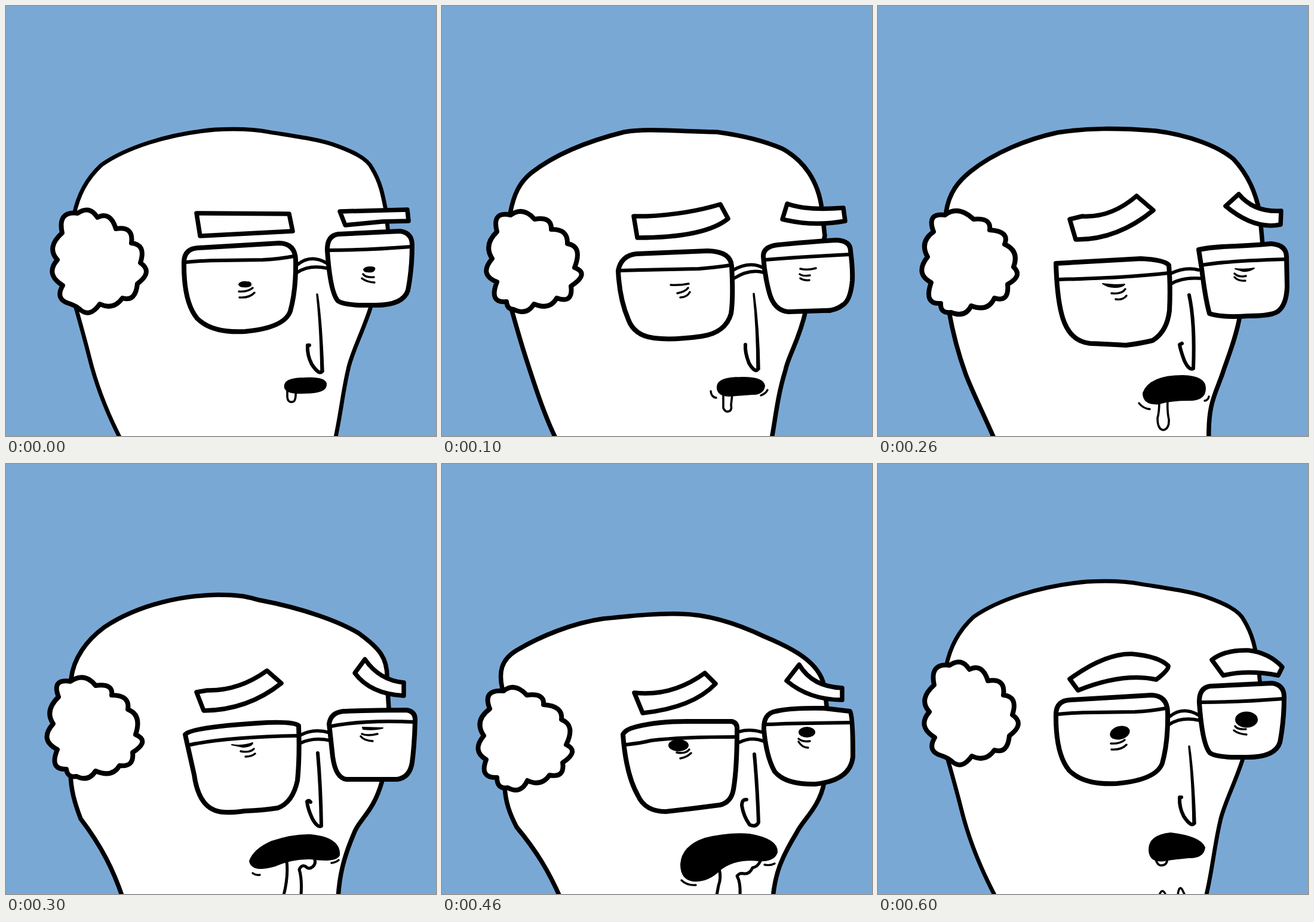
Recreate the animation shown at these times as an HTML page without scripts. Size 720x720 px, loop 700 ms.

```html
<!DOCTYPE html>
<html lang="en">
<head>
<meta charset="utf-8">
<title>Yawn</title>
<style>
html, body { margin: 0; width: 100%; height: 100%; overflow: hidden; background: #7aa8d4; }
svg { display: block; width: 100vw; height: 100vh; }
/* poses sit side by side; the strip jumps one stage width at a time */
.strip { animation: roll .7s steps(7) infinite; }
@keyframes roll { to { transform: translateX(-5040px); } }
path { fill: #fff; stroke: #000; stroke-width: 7.5; stroke-linecap: round; stroke-linejoin: round; }
.slim { stroke-width: 6.8; }
.hair { stroke-width: 8; }
.lens { stroke-width: 8; }
.lid, .nose { fill: none; stroke-width: 6; }
.bridge { fill: none; stroke-width: 5.5; }
.thin { fill: none; stroke-width: 3.4; }
.drool { stroke-width: 3.6; }
.drip { fill: none; stroke-width: 5; }
.ink { fill: #000; stroke-width: 2; }
.ridge { fill: #000; stroke-width: 3.5; }
</style>
</head>
<body>
<svg viewBox="0 0 720 720">
<defs>
  <g id="calm">
    <path class="slim" d="M198 737C165 675 150 630 140 590C132 558 124 530 117 505L114 350C120 318 134 290 160 266C200 238 270 214 350 207C390 205 420 207 440 211C490 219 520 223 545 231C580 243 605 255 613 272C627 295 631 316 636 342L640 380L612 500C600 540 578 582 573 608C563 650 560 690 549 735Z"/>
    <path class="hair" d="M120 347Q140 333 153 354Q175 343 184 373Q214 368 210 397Q235 399 225 430Q247 445 220 465Q217 496 195 489Q180 510 157 499Q141 522 125 509Q117 502 108 499Q81 492 95 468Q65 449 86 425Q67 404 94 380Q86 343 120 347Z"/>
    <path class="lens" d="M298 428Q299 406 322 405L458 397Q484 398 485 425Q486 475 476 511Q466 539 400 545Q345 548 320 523Q297 495 298 428Z"/>
    <path class="lens" d="M538 410Q537 385 556 382L660 377Q680 380 680 400Q680 440 673 476Q665 502 615 501Q568 502 556 494Q543 480 538 410Z"/>
    <path class="lid" d="M301 429Q330 426 360 426L430 425Q455 424 482 419M540 409Q600 409 679 403"/>
    <path class="bridge" d="M488 433Q510 415 536 430M488 446Q508 433 537 439"/>
    <path class="thin" d="M390 478Q405 479 413 472M391 488Q408 489 416 480M598 449Q602 455 616 454M596 456Q603 462 617 463"/>
    <path class="ridge" d="M521 483Q528 530 531 612L528 612Q527 540 521 483Z"/>
    <path class="nose" d="M529 612Q524 618 512 600Q504 585 505 568l3 0"/>
  </g>
  <g id="tense">
    <path d="M196 728C180 680 160 640 125 594C114 565 109 545 108 520L109 360C113 325 135 295 165 273C225 233 300 220 355 219C395 219 405 223 425 228C500 242 560 265 590 283C625 308 640 325 638 362L641 410L630 530C615 585 590 595 582 620C565 660 558 690 556 728Z"/>
    <path class="hair" d="M108 364Q132 348 150 371Q180 367 177 387Q208 387 204 411Q228 420 217 453Q242 464 212 483Q215 508 190 505Q178 526 150 514Q138 533 118 523Q103 526 101 511Q72 512 86 478Q55 462 79 435Q64 413 88 390Q76 359 108 364Z"/>
    <path d="M319 382L337 379Q390 380 437 346L461 367Q405 412 331 413Z"/>
    <path d="M584 350L601 327Q625 362 666 366L666 388Q610 385 584 350Z"/>
  </g>
</defs>
<g class="strip">

<g>
  <use href="#calm"/>
  <path d="M319 347L474 348L480 377L325 385Z"/>
  <path d="M559 344L672 341L674 360L630 361L568 367Z"/>
  <path class="ink" d="M390 466Q393 461 403 462Q411 462 410 467Q408 471 397 470Q391 470 390 466ZM599 441Q602 437 610 437Q619 437 617 441Q616 446 606 445Q599 445 599 441Z"/>
  <path class="drool" d="M471 644V655Q472 664 479 663Q486 663 485 645"/>
  <path class="ink" d="M467 634Q470 623 500 623Q533 621 536 632Q538 648 500 648Q463 650 467 634Z"/>
</g>

<g transform="translate(720)">
  <path d="M196 735C172 690 152 625 140 588C131 560 124 535 117 510L114 348C120 315 130 295 150 279C190 248 245 226 305 211C345 204 390 210 460 211C505 217 540 226 570 239C605 258 630 292 636 340L641 385L609 510C598 560 580 585 575 610C561 655 558 695 551 730Z"/>
  <path class="hair" d="M115 350Q136 335 155 357Q184 352 183 374Q211 373 210 398Q236 402 222 438Q248 448 216 469Q220 499 192 489Q181 510 154 499Q142 519 120 508Q109 508 108 495Q78 498 92 462Q61 450 84 423Q69 400 92 378Q83 343 115 350Z"/>
  <path class="lens" d="M295 443Q300 418 325 415L445 410Q483 411 485 435Q488 490 484 515Q475 547 435 553Q385 560 355 556Q322 552 312 525Q297 490 295 443Z"/>
  <path class="lens" d="M538 420Q537 403 562 400Q600 396 660 392Q684 393 684 410Q688 440 687 460Q684 492 672 500Q658 511 640 510L580 512Q556 510 548 480Q540 450 538 420Z"/>
  <path class="lid" d="M296 443L430 440Q465 437 482 434M541 425Q600 420 683 416"/>
  <path class="bridge" d="M488 442Q515 427 537 438M489 456Q515 440 538 446"/>
  <path class="thin" d="M383 467Q398 468 413 465M394 481Q408 478 412 472M399 488Q410 488 415 479M600 440Q612 443 626 439M599 449Q604 453 616 451M600 456Q606 460 615 459"/>
  <path class="ridge" d="M522 482Q530 540 531 608L528 608Q528 540 522 482Z"/>
  <path class="nose" d="M529 608Q524 615 514 598Q507 580 508 567"/>
  <path d="M321 352L342 352Q410 349 466 332L479 356Q440 388 327 388Z"/>
  <path d="M578 331Q610 343 672 338L675 360Q620 370 570 357Z"/>
  <path class="drool" d="M471 650V673Q474 680 479 679Q486 678 484 668L486 650"/>
  <path class="ink" d="M461 637Q462 622 500 622Q538 621 540 636Q538 650 520 650L480 653Q460 652 461 637Z"/>
  <path class="thin" d="M450 645Q451 655 459 656M534 652Q542 649 545 643"/>
</g>

<g transform="translate(1440)">
  <path d="M197 730C180 690 155 640 146 614C132 575 124 540 119 512L114 345C119 312 135 293 155 277C195 245 250 223 300 212C350 204 400 204 465 209C520 216 570 235 595 256C620 283 632 312 639 345L644 400L606 518C600 555 585 590 577 615C565 650 552 665 554 730Z"/>
  <path class="hair" d="M112 350Q134 333 160 357Q190 354 187 375Q221 377 212 399Q237 410 227 437Q243 452 217 466Q220 497 195 489Q184 513 156 502Q146 523 122 513Q104 515 105 498Q76 500 89 463Q61 448 83 420Q69 395 93 378Q81 346 112 350Z"/>
  <path class="lens" d="M298 431L440 423Q480 425 487 434Q490 470 488 510Q484 545 460 560Q440 565 415 568Q380 566 355 565Q325 562 312 530Q300 500 298 431Z"/>
  <path class="lens" d="M537 408Q560 403 600 402Q640 400 658 398Q684 400 684 420L685 470Q684 500 670 511Q660 519 620 519Q575 522 555 515Q548 490 542 440Z"/>
  <path class="lid" d="M301 458Q420 455 487 447M542 434Q580 427 683 424"/>
  <path class="bridge" d="M490 448Q515 436 537 442M491 465Q510 454 539 456"/>
  <path class="ink" d="M376 465Q400 468 413 466Q410 471 396 471Q385 471 376 465ZM598 440Q615 442 630 439Q622 445 611 444Z"/>
  <path class="thin" d="M391 481Q408 483 414 474M398 491Q410 493 416 485M597 448Q604 455 616 452M597 454Q603 461 615 460"/>
  <path class="nose" d="M521 484Q531 530 528 607Q521 611 513 594Q506 575 505 567l4-2"/>
  <path d="M321 357L342 352Q390 355 433 318L461 342Q400 392 331 391Z"/>
  <path d="M582 335L604 315Q630 346 675 343L674 366Q630 375 582 335Z"/>
  <path class="drool" d="M471 660Q471 680 468 690Q468 709 478 710Q488 708 487 692Q484 680 485 658"/>
  <path class="ink" d="M444 648Q455 619 510 619Q548 620 548 640Q548 661 520 660Q490 660 470 666Q444 668 444 648Z"/>
  <path class="thin" d="M437 665Q444 674 455 675M547 661Q553 660 554 654"/>
</g>

<g transform="translate(2160)">
  <use href="#tense"/>
  <path class="lens" d="M300 453Q310 441 420 434Q480 430 490 438Q492 490 488 530Q480 567 455 576Q430 580 400 581Q365 586 350 580Q322 570 315 520Z"/>
  <path class="lens" d="M541 435Q544 416 565 414Q620 412 670 412Q686 414 685 430Q684 470 680 500Q676 525 655 528L570 528Q552 526 547 490Z"/>
  <path class="lid" d="M309 470Q370 457 489 455M545 439Q600 428 684 432"/>
  <path class="bridge" d="M493 454Q515 442 542 450M494 467Q515 457 543 463"/>
  <path class="ink" d="M378 470Q395 473 413 467Q412 473 397 474ZM597 441L631 442Q618 446 598 444Z"/>
  <path class="thin" d="M393 481Q408 484 415 477M401 490Q411 490 417 485M596 452Q605 456 622 452M594 456Q599 463 614 464"/>
  <path class="nose" d="M522 484Q527 540 528 606Q522 610 513 594Q505 577 504 565q3-3 6 1"/>
  <path class="drip" d="M470 665Q473 690 465 722M516 660Q520 668 514 674Q507 680 502 674Q495 670 491 679Q496 695 494 722"/>
  <path class="ink" d="M408 665Q415 645 445 632Q480 620 510 621Q560 626 558 655Q552 667 510 661Q480 660 450 673Q412 684 408 665Z"/>
  <path class="thin" d="M413 685Q418 689 425 688M545 668Q553 667 557 663"/>
</g>

<g transform="translate(2880)">
  <path d="M198 726C180 685 160 650 125 608C113 585 106 565 105 540L101 376C95 350 98 328 125 312C165 288 220 266 270 259C330 253 360 250 400 251C450 252 500 270 540 289C588 309 632 332 640 372L644 405L640 533C632 575 605 595 594 617C568 660 558 685 554 726Z"/>
  <path class="hair" d="M103 380Q122 365 142 387Q172 383 170 403Q203 405 200 428Q224 437 208 470Q231 481 202 500Q206 526 180 521Q166 541 143 530Q132 554 110 542Q92 545 92 525Q62 526 74 495Q49 480 70 455Q53 430 80 410Q67 377 103 380Z"/>
  <path class="lens" d="M303 453Q306 445 325 440Q360 431 410 431L485 431Q495 433 494 445Q494 510 488 545Q484 567 465 571Q420 577 375 582Q340 582 328 555Q308 520 303 453Z"/>
  <path class="lens" d="M539 445Q538 420 555 415Q580 408 640 409L683 414Q688 420 688 490Q684 530 625 536Q575 537 557 515Q543 490 539 445Z"/>
  <path class="lid" d="M306 470Q330 468 350 463Q400 457 493 457M542 436Q590 434 686 433"/>
  <path class="bridge" d="M498 448Q515 443 536 449M498 466Q518 456 538 464"/>
  <ellipse cx="396" cy="471" rx="17" ry="10"/>
  <ellipse cx="611" cy="449" rx="14" ry="9"/>
  <path class="thin" d="M393 483Q408 486 414 478M399 493Q410 491 417 484M597 460Q604 466 616 464M597 465Q603 475 613 475"/>
  <path class="nose" d="M523 486Q528 540 530 600Q526 609 515 604Q505 590 502 572Q502 561 510 562"/>
  <path d="M322 383Q385 390 440 350L458 368Q420 408 336 417Z"/>
  <path d="M577 363L598 336Q620 373 670 375L670 395Q615 395 577 363Z"/>
  <path class="drip" d="M464 678Q468 692 463 706L460 722M533 665Q528 675 520 676Q515 687 506 686Q498 684 494 690Q500 700 499 722"/>
  <path class="ink" d="M400 670Q402 640 440 627Q480 617 515 620Q562 628 561 650Q556 666 530 664Q490 660 465 680Q445 700 420 698Q400 695 400 670Z"/>
  <path class="thin" d="M401 697Q410 706 425 705M540 671Q550 673 557 669"/>
</g>

<g transform="translate(3600)">
  <use href="#tense"/>
  <path class="lens" d="M300 440Q303 432 340 428Q400 424 480 424Q490 425 491 435L492 500Q490 550 483 560Q460 569 420 575Q380 578 345 572Q320 558 312 525Q298 485 300 440Z"/>
  <path class="lens" d="M537 450Q536 415 552 407Q590 400 635 400Q660 400 683 403Q691 408 692 440Q696 480 692 500Q688 515 665 521Q640 526 605 525Q565 522 550 507Q538 485 537 450Z"/>
  <path class="lid" d="M303 466Q360 457 430 453L491 453M541 433Q600 425 690 427"/>
  <path class="bridge" d="M494 447Q515 434 535 443M496 463Q515 452 536 458"/>
  <ellipse cx="403" cy="472" rx="15" ry="7.5" transform="rotate(-6 403 472)"/>
  <ellipse cx="621" cy="452" rx="20" ry="15" transform="rotate(28 621 452)"/>
  <path class="thin" d="M391 488Q412 490 419 480M400 500Q413 496 421 486M598 462Q604 472 617 477M597 474Q600 482 608 487"/>
  <path class="nose" d="M524 482Q527 540 530 600Q526 610 519 602Q508 585 505 565Q508 556 514 566"/>
  <path class="drool" d="M465 722Q466 700 478 695Q488 697 492 722M503 686Q515 678 514 692Q512 708 506 707Q500 705 503 686Z"/>
  <path class="ink" d="M435 660Q436 628 465 623Q500 617 525 620Q552 630 557 650Q558 668 535 674Q500 678 470 682Q435 684 435 660Z"/>
  <path class="thin" d="M432 676Q437 686 447 685M541 679Q549 679 551 673"/>
</g>

<g transform="translate(4320)">
  <use href="#calm" y="-10"/>
  <path d="M321 360Q380 317 425 318Q470 322 486 338Q488 344 466 361Q410 349 335 379Z"/>
  <path d="M559 328Q580 311 620 312Q655 316 677 340L670 354Q620 344 578 354Z"/>
  <ellipse cx="405" cy="450" rx="17" ry="11" transform="rotate(-15 405 450)"/>
  <ellipse cx="617" cy="428" rx="19" ry="13.5"/>
  <path class="drool" d="M465 662Q468 673 475 672Q484 672 485 660M471 722Q476 708 482 722M502 722Q504 705 509 712L514 722"/>
  <path class="ink" d="M454 645Q454 622 490 618Q540 624 547 642Q545 660 520 659Q490 662 480 664Q454 668 454 645Z"/>
</g>

</g>
</svg>
</body>
</html>
```
